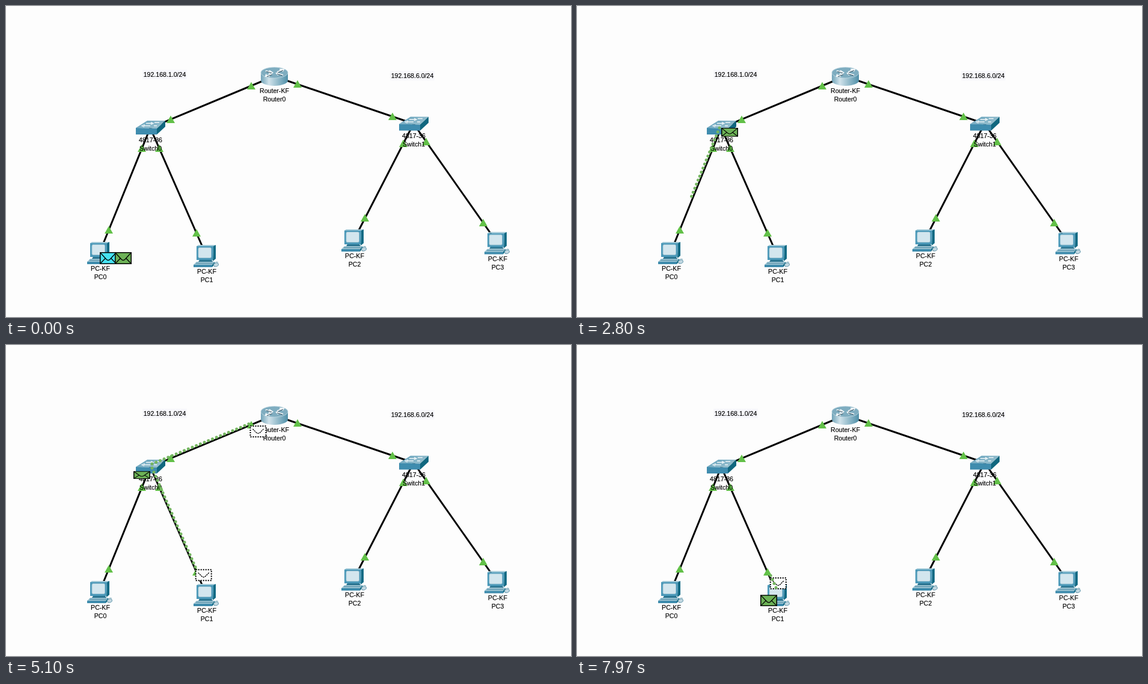
Animation of 940x518 px, one loop 8000 ms. Source, as an HTML page:

```html
<!DOCTYPE html>
<html lang="en">
<head>
<meta charset="utf-8">
<title>Network packet flow</title>
<style>
  html, body { margin: 0; width: 100%; height: 100%; overflow: hidden; background: #fdfdfd; }
  svg { display: block; width: 100vw; height: 100vh; }
  text { font: 10.6px "Liberation Sans", Arial, sans-serif; text-anchor: middle; fill: #000; stroke: #000; stroke-width: .15; }
</style>
</head>
<body>
<svg viewBox="0 0 940 518" xmlns="http://www.w3.org/2000/svg">
  <defs>
    <linearGradient id="metal">
      <stop offset="0" stop-color="#6fa3b8"/>
      <stop offset=".3" stop-color="#d0e2ea"/>
      <stop offset="1" stop-color="#4f8fa8"/>
    </linearGradient>
    <linearGradient id="plate" x2="1" y2=".6">
      <stop offset="0" stop-color="#5b9cb8"/>
      <stop offset="1" stop-color="#9cc2d0"/>
    </linearGradient>

    <g id="pc">
      <path d="M11 23H29L32 28H8Z" fill="#2a7490"/>
      <path d="M5 2L8 0H37L33 2Z" fill="#a3cad8"/>
      <path d="M33 2L37 0V23L32 27Z" fill="#126a84"/>
      <path d="M5 2H33L32 25H5Z" fill="#4a98b8"/>
      <rect x="8" y="4.5" width="21.5" height="17" rx="2" fill="#d3e6ee" stroke="#9dc3d2"/>
      <path d="M5 28H35L31 33H0Z" fill="#9cc3d2"/>
      <path d="M4 30.5H32" stroke="#5490a8" stroke-width="1.2"/>
      <path d="M0 33H31V37H0Z" fill="#3d8bac"/>
      <path d="M31 33L35 28V32L31 37Z" fill="#126a84"/>
      <path d="M35 30Q38 27 41 29" fill="none" stroke="#7aa8b8"/>
      <ellipse cx="37.5" cy="33" rx="4" ry="2.8" fill="#c4d9e2" stroke="#6a9cb0" transform="rotate(-18 37.5 33)"/>
    </g>

    <g id="switch">
      <path d="M0 12L19 0H49L35 13Z" fill="url(#plate)"/>
      <path d="M0 12L35 13V23H0Z" fill="#3f8cae"/>
      <path d="M35 13L49 0V10L35 23Z" fill="#10677f"/>
      <path d="M17 4.5H27M25 2.5L29 4.5L25 6.5M24 8.5H13M15 6.5L10 8.5L14 10.5M30 8.5H35M31 3H39" fill="none" stroke="#eef5f8" stroke-width="1.3"/>
    </g>

    <g id="router">
      <path d="M0 9V22A22.5 9 0 0 0 45 22V9Z" fill="url(#metal)"/>
      <ellipse cx="22.5" cy="9" rx="22.5" ry="9" fill="#7fadc0" stroke="#c0d8e2" stroke-width=".8"/>
      <path d="M8 6L18 8.5M14 5.5L19 8.8L13 10M27 8L37 4M31 3.5L38 3.5L36 7M26 10L37 13M30 9L26 10L29 13M19 11L9 14.5M9 11.5L8 15L15 15" fill="none" stroke="#f4f8fa" stroke-width="2"/>
      <path d="M9 7.2L18 9.5M28 9L37 5.2M27 11.2L36 14M19 12.2L10 15.6" stroke="#28495a"/>
    </g>

    <g id="mail">
      <rect x=".75" y=".75" width="26.5" height="18.5" stroke="#000" stroke-width="1.5"/>
      <path d="M1 1L11 12Q14 15 17 12L27 1M1 19L9 10.5M27 19L19 10.5" fill="none" stroke="#000" stroke-width="1.3"/>
    </g>
    <g id="ghost">
      <rect x="1" y="1" width="26" height="18" fill="#fdfdfd" stroke="#000" stroke-width="2" stroke-dasharray="2 2"/>
      <path d="M5 6L11 12Q14 14.5 17 12L23 6" fill="none" stroke="#000" stroke-width="1.3" stroke-dasharray="2.5 1"/>
    </g>
  </defs>
  <rect width="940" height="518" fill="#fdfdfd"/>
  <g id="net"></g>
  <g id="live"></g>
</svg>
<script>
const LOOP = 8000, TRAVEL = 1450, DOTS = 30, FOLD = 0.45;
const net = document.getElementById("net");
const live = document.getElementById("live");

const nodes = {
  router: [446, 117], sw0: [240, 203], sw1: [678, 196],
  pc0: [156, 410], pc1: [333, 415], pc2: [579, 389], pc3: [817, 394]
};

// show/clear bound what is visible; start is when the packet leaves.
const hops = [
  { start: 760, show: 1000, clear: 3600, end: 3970, from: "pc0",
    to: [{ node: "sw0", a: [155, 404], b: [237, 203] }] },
  { start: 3935, show: 3970, clear: 6840, end: 7779, from: "sw0",
    to: [{ node: "router", a: [243, 198], b: [444, 115] },
         { node: "pc1", a: [243, 205], b: [333, 411] }] },
  { start: 7779, show: 7779, clear: LOOP, end: LOOP, from: "pc1",
    to: [{ node: "sw0", a: [331, 404], b: [243, 205] }] }
];

const mix = (a, b, p) => [a[0] + (b[0] - a[0]) * p, a[1] + (b[1] - a[1]) * p];
const use = (id, x, y, extra = "") =>
  `<use href="#${id}" transform="translate(${x} ${y})${extra}"/>`;
const mail = (x, y, scale = 1, fill = "#6db257") =>
  `<g fill="${fill}">${use("mail", x, y, ` scale(1 ${scale})`)}</g>`;
const label = (x, y, ...rows) =>
  rows.map((row, i) => `<text x="${x}" y="${y + 14 * i}">${row}</text>`).join("");
const note = (x, y, row) =>
  `<rect x="${x - 37}" y="${y - 12}" width="74" height="16" fill="#f7f7fb"/>` + label(x, y, row);

function drawNet() {
  const links = [["router", "sw0"], ["router", "sw1"], ["sw0", "pc0"],
                 ["sw0", "pc1"], ["sw1", "pc2"], ["sw1", "pc3"]];
  const lights = [[408, 133], [485, 130], [274, 189], [643, 184], [226, 237], [255, 237],
                  [171, 373], [317, 378], [661, 229], [699, 226], [597, 353], [794, 361]];
  const lines = links.map(([a, b]) => `M${nodes[a]}L${nodes[b]}`).join("");
  const marks = lights.map(([x, y]) => `M${x} ${y - 6.5}l7 12.5h-14z`).join("");
  net.innerHTML =
    `<path d="${lines}" stroke="#000" stroke-width="3"/>` +
    use("router", 424, 102) + use("switch", 216, 191) + use("switch", 654, 184.5) +
    use("pc", 135, 393) + use("pc", 312, 398) + use("pc", 558, 372) + use("pc", 796, 376.5) +
    `<path d="${marks}" fill="#62c048"/>` +
    note(264, 118, "192.168.1.0/24") + note(676, 120, "192.168.6.0/24") +
    label(446.5, 145, "Router-KF", "Router0") +
    label(240.5, 227, "4817-36", "Switch0") + label(678.5, 220, "4817-36", "Switch1") +
    label(157, 441, "PC-KF", "PC0") + label(334, 446, "PC-KF", "PC1") +
    label(580, 420, "PC-KF", "PC2") + label(818, 425, "PC-KF", "PC3");
}

function trail(a, b, tail, head) {
  let out = "";
  for (let i = 0; i <= DOTS; i++) {
    const p = i / DOTS;
    if (p < tail || p > head) continue;
    const [x, y] = mix(a, b, p);
    out += `<circle cx="${x}" cy="${y}" r="2.5"/>`;
  }
  return out;
}

function drawHop(hop, t) {
  const p = (t - hop.start) / TRAVEL;
  const head = Math.min(p, 1), tail = Math.min(Math.max(p - 1, 0), 1);
  const [x, y] = nodes[hop.from];
  let ghosts = "", dots = "", mails = "";
  for (const { node, a, b } of hop.to) {
    if (t < hop.clear) dots += trail(a, b, tail, head);
    if (p < 1) {
      ghosts += use("ghost", ...mix([x, y], nodes[node], p));
    } else {
      // The arriving envelope unfolds downwards.
      const size = t < hop.clear ? 1 - FOLD * (1 - tail) : 1;
      mails += mail(...nodes[node], size);
    }
  }
  // The departing envelope folds towards its lower edge.
  if (p < 1) mails += mail(x - 28, y + 20 * FOLD * p, 1 - FOLD * p);
  return ghosts + `<g fill="#74b560">${dots}</g>` + mails;
}

function render(t) {
  const hop = hops.find(h => t >= h.show && t < h.end);
  live.innerHTML = hop ? drawHop(hop, t)
    : mail(156, 410, 1, "#46e2f2") + mail(181, 410);
}

let origin;
function tick(now) {
  origin ??= now;
  render((now - origin) % LOOP);
  requestAnimationFrame(tick);
}

drawNet();
render(0);
requestAnimationFrame(tick);
</script>
</body>
</html>
```
